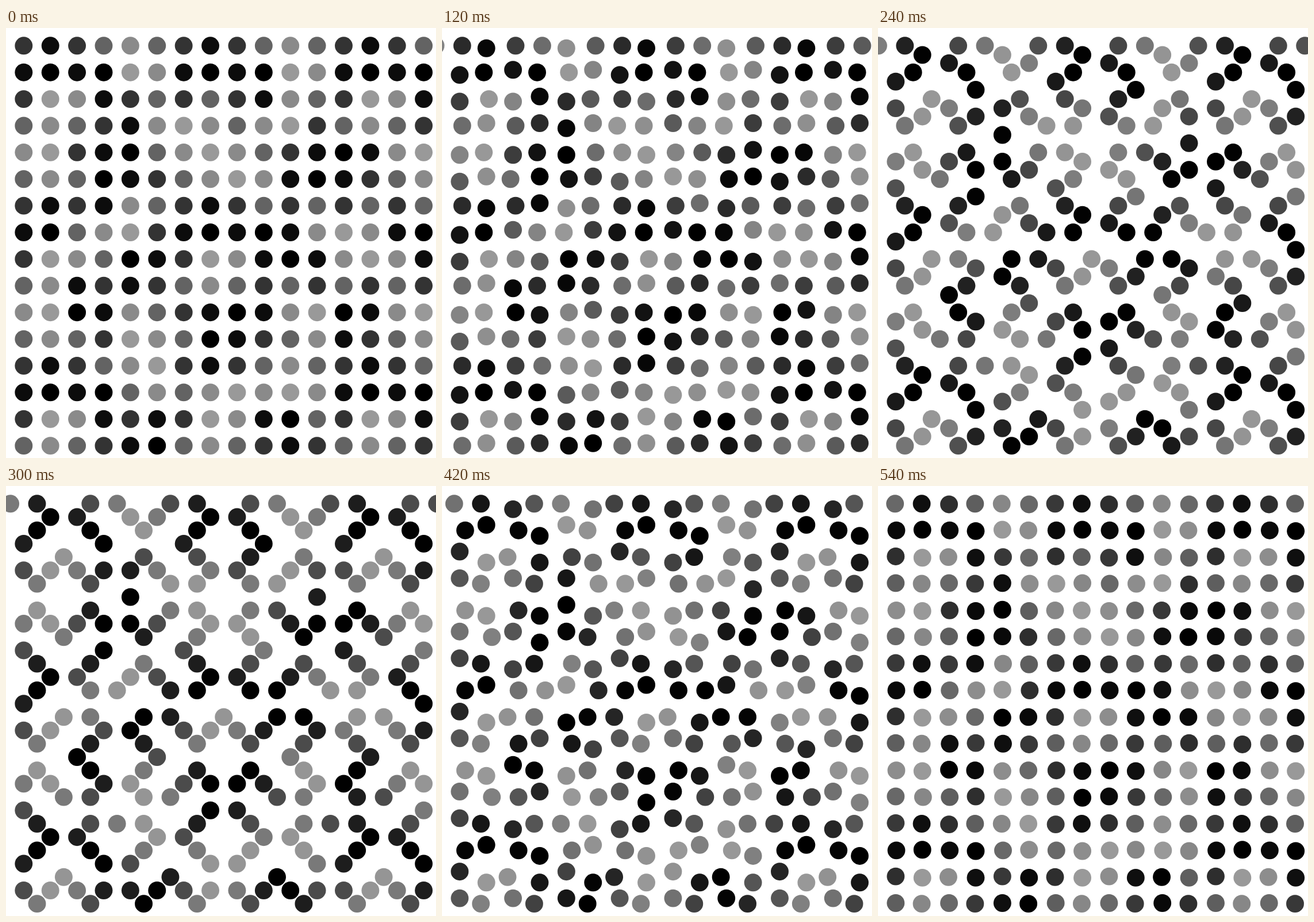
An HTML page with a canvas that plays this animation: 748 by 748 pixels, repeating every 0.6 s.

```html
<!DOCTYPE html>
<html lang="en">
<head>
<meta charset="utf-8">
<title>Dots along a Hilbert curve</title>
<style>
  html, body { margin: 0; width: 100%; height: 100%; overflow: hidden; background: #fff; }
  canvas { display: block; }
</style>
</head>
<body>
<canvas id="stage" width="748" height="748"></canvas>
<script>
const ctx = document.getElementById('stage').getContext('2d');
const SIZE = 16, COUNT = SIZE * SIZE;
const ORIGIN = 30.8, GAP = 46.39, RADIUS = 15.45;
const LOOP = 600, STEPS = 10;

// Cell at distance d along the Hilbert curve.
function hilbert(d) {
  let x = 0, y = 0;
  for (let s = 1; s < SIZE; s *= 2, d >>= 2) {
    const rx = (d >> 1) & 1, ry = (d ^ rx) & 1;
    if (!ry) {
      if (rx) { x = s - 1 - x; y = s - 1 - y; }
      [x, y] = [y, x];
    }
    x += s * rx;
    y += s * ry;
  }
  return [x, y];
}

// The path runs in from the left edge and out past the right one.
const path = [[-1, 0]];
for (let i = 0; i < COUNT; i++) path.push(hilbert(i));
path.push([SIZE, 0]);

// Shade phase; the dots at both ends run out of sequence.
function phase(i) {
  if (i === 0) return 4;
  if (i === COUNT) return 3;
  return 3 - i;
}

function shade(k) {
  const v = Math.max(0, Math.round(75 - 78 * Math.cos(k * Math.PI / 5)));
  return `rgb(${v},${v},${v})`;
}

function draw(t) {
  const ease = (1 - Math.cos(Math.PI * t)) / 2;
  const at = (a, b) => ORIGIN + GAP * (a + (b - a) * ease);
  ctx.fillStyle = '#fff';
  ctx.fillRect(0, 0, 748, 748);
  for (let i = 0; i <= COUNT; i++) {
    const [x0, y0] = path[i], [x1, y1] = path[i + 1];
    ctx.fillStyle = shade(phase(i) - t);
    ctx.beginPath();
    ctx.arc(at(x0, x1), at(y0, y1), RADIUS, 0, 2 * Math.PI);
    ctx.fill();
  }
}

function tick() {
  const time = performance.now() % LOOP;
  draw(Math.floor(time / LOOP * STEPS) / STEPS);
  requestAnimationFrame(tick);
}
tick();
</script>
</body>
</html>
```
